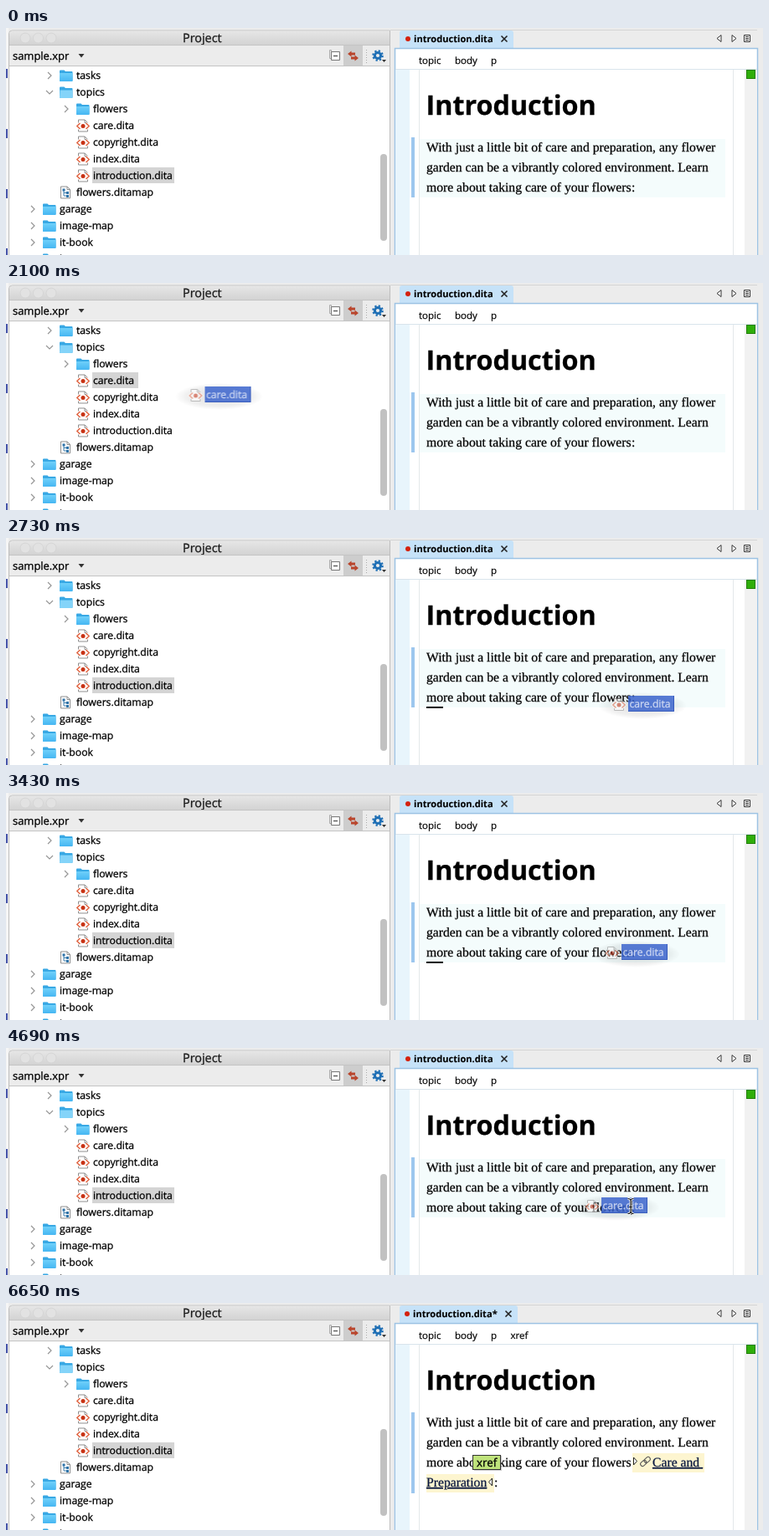
Animation, 904 px wide and 272 px high, one loop 6720 ms. Source, as an HTML page:

```html
<!DOCTYPE html>
<html lang="en">
<head>
<meta charset="utf-8">
<title>Dragging a topic into the editor</title>
<style>
html, body { margin: 0; width: 100%; height: 100%; overflow: hidden; background: #fff; }
svg { display: block; width: 904px; height: 272px; }
text {
  font: 12.2px "Open Sans", "Noto Sans", sans-serif;
  text-rendering: geometricPrecision; white-space: pre;
  color: #000; fill: currentColor; stroke: currentColor; stroke-width: .3;
}
.title { font-size: 14.4px; color: #1a1a1a; }
.combo { font-size: 12.95px; }
.tab { font-size: 11.1px; font-weight: 700; stroke-width: .1; }
.crumb { font-size: 11.5px; stroke-width: .2; }
.h1 { font-size: 32.3px; font-weight: 700; }
.tip { font-size: 13.4px; }
.para text { font: 15.68px "Liberation Serif", "Times New Roman", serif; stroke-width: .25; }
.para .link { color: #0a1840; text-decoration: underline; }
.chev { fill: none; stroke: #969696; stroke-width: 1.2; }
.sel { fill: #d4d4d4; }

/* One loop is 96 ticks of 70 ms */
.anim { animation: 6.72s step-end infinite; }
.other { animation-name: other; }
.care { animation-name: care; }
.ghost { animation-name: ghost; }
.drag { animation: drag 6.72s linear infinite; }
.drop { animation-name: drop; }
.bar { animation-name: bar; }
.beam { animation-name: beam; }
.before { animation-name: before; }
.after { animation-name: after; }
.late { animation-name: late; }
.blink { animation-name: blink; }

@keyframes other { 0%, 37.49%, 100% { opacity: 1 } 26.03% { opacity: 0 } }
@keyframes care { 0%, 37.49%, 100% { opacity: 0 } 26.03% { opacity: 1 } }
@keyframes ghost { 0%, 74.99%, 100% { opacity: 0 } 30.2% { opacity: 1 } }
@keyframes before { 0% { opacity: 1 } 74.99%, 100% { opacity: 0 } }
@keyframes after { 0% { opacity: 0 } 74.99%, 100% { opacity: 1 } }
@keyframes late { 0% { opacity: 0 } 82.28%, 100% { opacity: 1 } }
@keyframes bar { 0%, 61.45%, 100% { opacity: 0 } 37.49% { opacity: 1 } }
@keyframes beam { 0%, 90.61%, 100% { opacity: 0 } 69.78% { opacity: 1 } }
@keyframes blink { 0%, 82.28%, 98.95%, 100% { opacity: 0 } 74.99%, 90.61% { opacity: 1 } }
@keyframes drop {
  0%, 37.49%, 74.99%, 100% { opacity: 0; transform: translate(0, 0) }
  33.32% { opacity: 1; transform: translate(535px, 157px) }
  34.37% { opacity: 1; transform: translate(629px, 157px) }
  35.41% { opacity: 1; transform: translate(677px, 157px) }
  36.45% { opacity: 1; transform: translate(725px, 181px) }
  61.45% { opacity: 1; transform: translate(746px, 181px) }
}
@keyframes drag {
  0% { transform: translate(103px, 107px); animation-timing-function: step-end }
  30.2% { transform: translate(130px, 111px); animation-timing-function: steps(2) }
  32.28% { transform: translate(345px, 137px); animation-timing-function: steps(2) }
  34.37% { transform: translate(595px, 167px); animation-timing-function: steps(2) }
  36.45% { transform: translate(692px, 184px); animation-timing-function: steps(3) }
  39.57% { transform: translate(739px, 192px); animation-timing-function: step-end }
  40.61% { transform: translate(743px, 189px); animation-timing-function: steps(2) }
  42.7% { transform: translate(745px, 188px); animation-timing-function: step-end }
  44.78% { transform: translate(745px, 188px); animation-timing-function: steps(6) }
  51.03% { transform: translate(735px, 181px); animation-timing-function: step-end }
  52.07% { transform: translate(735px, 181px); animation-timing-function: steps(4) }
  56.24% { transform: translate(726px, 179px); animation-timing-function: step-end }
  57.28% { transform: translate(726px, 179px); animation-timing-function: steps(5) }
  62.49%, 100% { transform: translate(711px, 179px) }
}
</style>
</head>
<body>
<svg viewBox="0 0 904 272" xmlns="http://www.w3.org/2000/svg">
<defs>
  <linearGradient id="head" x2="0" y2="1">
    <stop offset="0" stop-color="#e6e6e6"/><stop offset="1" stop-color="#d3d3d3"/>
  </linearGradient>
  <linearGradient id="blue" x2="0" y2="1">
    <stop offset="0" stop-color="#6fd0fa"/><stop offset="1" stop-color="#45b6f2"/>
  </linearGradient>
  <radialGradient id="shade">
    <stop offset="0" stop-color="#000" stop-opacity=".13"/>
    <stop offset=".75" stop-color="#000" stop-opacity=".06"/>
    <stop offset="1" stop-color="#000" stop-opacity="0"/>
  </radialGradient>
  <!-- icons are centred on the middle of a row -->
  <path id="back" d="M0-5.5q0-1 1-1h4.500l1.500 1.500h7.500q1 0 1 1V6q0 1-1 1H1Q0 7 0 6z" fill="#38a8e4"/>
  <g id="folder">
    <use href="#back"/>
    <path d="M0-3h15.500V6q0 1-1 1H1Q0 7 0 6z" fill="url(#blue)"/>
  </g>
  <g id="open">
    <use href="#back"/>
    <path d="M.5-2.500h14.500L15.500 6q0 1-1 1H1Q0 7 0 6z" fill="#84d4f9"/>
  </g>
  <path id="page" d="M2.500-7h7.500l3.500 3.500V7h-11zM10-7v3.500h3.500" fill="#fff" stroke="#8f8f8f"/>
  <g id="file">
    <use href="#page"/>
    <path d="M4.500-3L.8.500 4.500 4M11.500-3L15.200.500 11.500 4" fill="none" stroke="#fff" stroke-width="3.500"/>
    <path d="M4.500-3L.8.500 4.500 4M11.500-3L15.200.500 11.500 4" fill="none" stroke="#e0603c" stroke-width="1.400"/>
    <circle cx="8" cy=".5" r="2.500" fill="#c83214"/>
  </g>
  <g id="map">
    <use href="#page" x="-1"/>
    <path d="M5-3V4H9M5 .5H9" fill="none" stroke="#3f7fae"/>
    <path d="M3.500-4.500h3v3h-3zM8-1h3v3H8zM8 3h3v3H8z" fill="#2f73a8"/>
  </g>
  <path id="shut" class="chev" d="M-2-4L2 0-2 4"/>
  <path id="down" class="chev" d="M-4-2L0 2 4-2"/>
  <path id="cross" d="M-3.500-3.500l7 7M3.500-3.500l-7 7" stroke="#222" stroke-width="1.600"/>
  <path id="ibeam" fill="none" d="M742.500 180.500q3.500 0 3.500 2.500v13q0 2.500-3.500 2.500M749.500 180.500q-3.500 0-3.500 2.500v13q0 2.500 3.500 2.500M744 190.500h4"/>
</defs>

<!-- project panel -->
<rect width="904" height="272" fill="#ececec"/>
<rect width="3" height="272" fill="#f5f5f5"/>
<path d="M0 49h2v11h-2zM0 121h2v11h-2zM0 193h2v11h-2zM0 264h2v8h-2z" fill="#4553a8"/>
<path d="M3.500 272V7q0-4 4-4H458.500V272" fill="#ececec" stroke="#bdbdbd"/>
<path d="M4 20V7q0-3.500 3.500-3.500H458V20z" fill="url(#head)"/>
<g fill="#e2e2e2" stroke="#d2d2d2" stroke-width=".8">
  <circle cx="23" cy="12" r="6"/><circle cx="38.500" cy="12" r="6"/><circle cx="54" cy="12" r="6"/>
</g>
<text class="title" x="211" y="17">Project</text>
<path d="M4 20.500H458M4 45.500H458" stroke="#c4c4c4"/>
<text class="combo" x="8" y="38">sample.xpr</text>
<path d="M86.500 31h7l-3.500 4.500z" fill="#333"/>

<g fill="none" stroke="#777">
  <path d="M388.500 29.500v-3h-2v10h2" stroke="#aaa"/>
  <path d="M388.500 28.500h10v10h-10z" fill="#fff"/>
  <path d="M391 33.500h5" stroke="#333"/>
</g>
<rect x="403" y="21" width="23" height="24" fill="#cdcdcd"/>
<path d="M408 31l4.500-3.500v2h4.500v3h-4.500v2zM421 36l-4.500-3.500v2h-4.500v3h4.500v2z" fill="#b9452c"/>
<path d="M430.500 26V42" stroke="#aaa" stroke-dasharray="1 2"/>
<g transform="translate(444 33)">
  <circle r="5.700" fill="none" stroke="#1f6fb5" stroke-width="2.200" stroke-dasharray="2.240 2.240"/>
  <circle r="3.600" fill="none" stroke="#1f6fb5" stroke-width="3"/>
  <path d="M5 5h5l-2.500 3z" fill="#333"/>
</g>

<rect x="4" y="46" width="454" height="226" fill="#fff"/>
<rect class="sel anim other" x="103" y="167" width="98" height="19"/>
<rect class="sel anim care" x="103" y="107" width="55" height="19"/>

<use href="#shut" x="52" y="57"/><use href="#folder" x="64" y="57"/><text x="84" y="61">tasks</text>
<use href="#down" x="52" y="77"/><use href="#open" x="64" y="77"/><text x="84" y="81">topics</text>
<use href="#shut" x="72" y="97"/><use href="#folder" x="84" y="97"/><text x="104" y="101">flowers</text>
<use href="#file" x="84" y="117"/><text x="104" y="121">care.dita</text>
<use href="#file" x="84" y="137"/><text x="104" y="141">copyright.dita</text>
<use href="#file" x="84" y="157"/><text x="104" y="161">index.dita</text>
<use href="#file" x="84" y="177"/><text x="104" y="181">introduction.dita</text>
<use href="#map" x="64" y="197"/><text x="84" y="201">flowers.ditamap</text>
<use href="#shut" x="32" y="217"/><use href="#folder" x="44" y="217"/><text x="64" y="221">garage</text>
<use href="#shut" x="32" y="237"/><use href="#folder" x="44" y="237"/><text x="64" y="241">image-map</text>
<use href="#shut" x="32" y="257"/><use href="#folder" x="44" y="257"/><text x="64" y="261">it-book</text>
<use href="#folder" x="44" y="277"/><text x="64" y="281">learn</text>
<rect x="447" y="151" width="8" height="104" rx="4" fill="#c1c1c1"/>

<!-- editor -->
<path d="M459 2.500H897" stroke="#d4d4d4"/>
<g class="anim before">
  <path d="M470 24V6q0-3 3-3H603q3 0 3 3V24z" fill="#c6e2f8"/>
  <circle cx="480" cy="13" r="3" fill="#d4210f"/>
  <text class="tab" x="487" y="17">introduction.dita</text>
  <use href="#cross" x="595" y="13"/>
</g>
<g class="anim after">
  <path d="M470 24V6q0-3 3-3H608q3 0 3 3V24z" fill="#c6e2f8"/>
  <circle cx="479" cy="13" r="3" fill="#d4210f"/>
  <text class="tab" x="486" y="17">introduction.dita*</text>
  <use href="#cross" x="600" y="13"/>
</g>
<path d="M854 8.500v8l-5-4zM867 8.500v8l5-4z" fill="#fff" stroke="#333"/>
<path d="M881.500 8.500h7v8h-7zM883 10.500h4M883 12.500h4M883 14.500h4" fill="#fff" stroke="#333"/>

<path d="M464.500 273V24.500H897.500V273" fill="#fff" stroke="#9dc3e4" stroke-width="1.500"/>
<rect x="882" y="50" width="15" height="222" fill="#f1f1f1"/>
<path d="M465 49.500H897" stroke="#d9e4ec"/>
<text class="crumb" x="493" y="43">topic</text>
<text class="crumb" x="536" y="43">body</text>
<text class="crumb" x="579" y="43">p</text>
<text class="crumb anim late" x="602.5" y="43">xref</text>

<rect x="465" y="50" width="17" height="222" fill="#e8f5fc"/>
<path d="M493.500 50V272M868.500 50V272" stroke="#e3e8ea"/>
<rect x="884.500" y="50.500" width="10" height="10" fill="#2fae0a" stroke="#228006"/>
<text class="h1" x="501.500" y="104">Introduction</text>

<rect class="anim before" x="494" y="133" width="365" height="70" fill="#f4fcfc"/>
<rect x="484" y="131" width="4" height="72" fill="#9dc7ee"/>
<rect class="anim late" x="484" y="203" width="4" height="25" fill="#9dc7ee"/>

<g class="para">
  <text x="502" y="148">With just a little bit of care and preparation, any flower</text>
  <text x="502" y="172">garden can be a vibrantly colored environment. Learn</text>
  <g class="anim after">
    <path d="M748 180h86v23h-86zM502 205h81v22h-81z" fill="#fdf5d0"/>
    <path d="M749.500 185v9l4-4.500zM580.500 210v9l-4-4.500z" fill="#fff" stroke="#222"/>
    <g transform="translate(763.500 190) rotate(-42)" fill="none" stroke="#555">
      <rect x="-7" y="-2.500" width="8" height="5" rx="2.500"/>
      <rect x="-1" y="-2.500" width="8" height="5" rx="2.500"/>
    </g>
    <text class="link" x="772" y="196">Care and </text>
    <text class="link" x="502" y="220">Preparation</text>
    <text x="583" y="220">:</text>
  </g>
  <text x="502" y="196">more about taking care of your flowers</text>
  <text class="anim before" x="747" y="196">:</text>
</g>

<rect class="anim blink" x="574" y="206" width="2" height="20"/>
<g class="anim late">
  <rect x="559" y="183" width="33" height="18" fill="#000" opacity=".2"/>
  <rect x="557.500" y="182.500" width="33" height="17" fill="#bfe37c" stroke="#333"/>
  <text class="tip" x="562" y="195.500">xref</text>
</g>

<!-- drag and drop -->
<rect class="anim bar" x="502" y="202" width="20" height="2"/>
<g class="anim ghost">
  <g class="drag">
    <ellipse cx="17" cy="12" rx="53" ry="16" fill="url(#shade)"/>
    <use href="#file" x="-19" y="10.500" opacity=".55"/>
    <rect width="55" height="19" fill="#3a63cd" opacity=".84"/>
    <path d="M0 18.500H54.500V0" fill="none" stroke="#2c50b4" opacity=".7"/>
    <text x="1.500" y="14" color="#fff" opacity=".7" style="color:#fff">care.dita</text>
  </g>
</g>
<rect class="anim drop" width="2" height="19"/>
<g class="anim beam">
  <use href="#ibeam" stroke="#fff" stroke-width="3"/>
  <use href="#ibeam" stroke="#111" stroke-width="1.200"/>
</g>
</svg>
</body>
</html>
```
